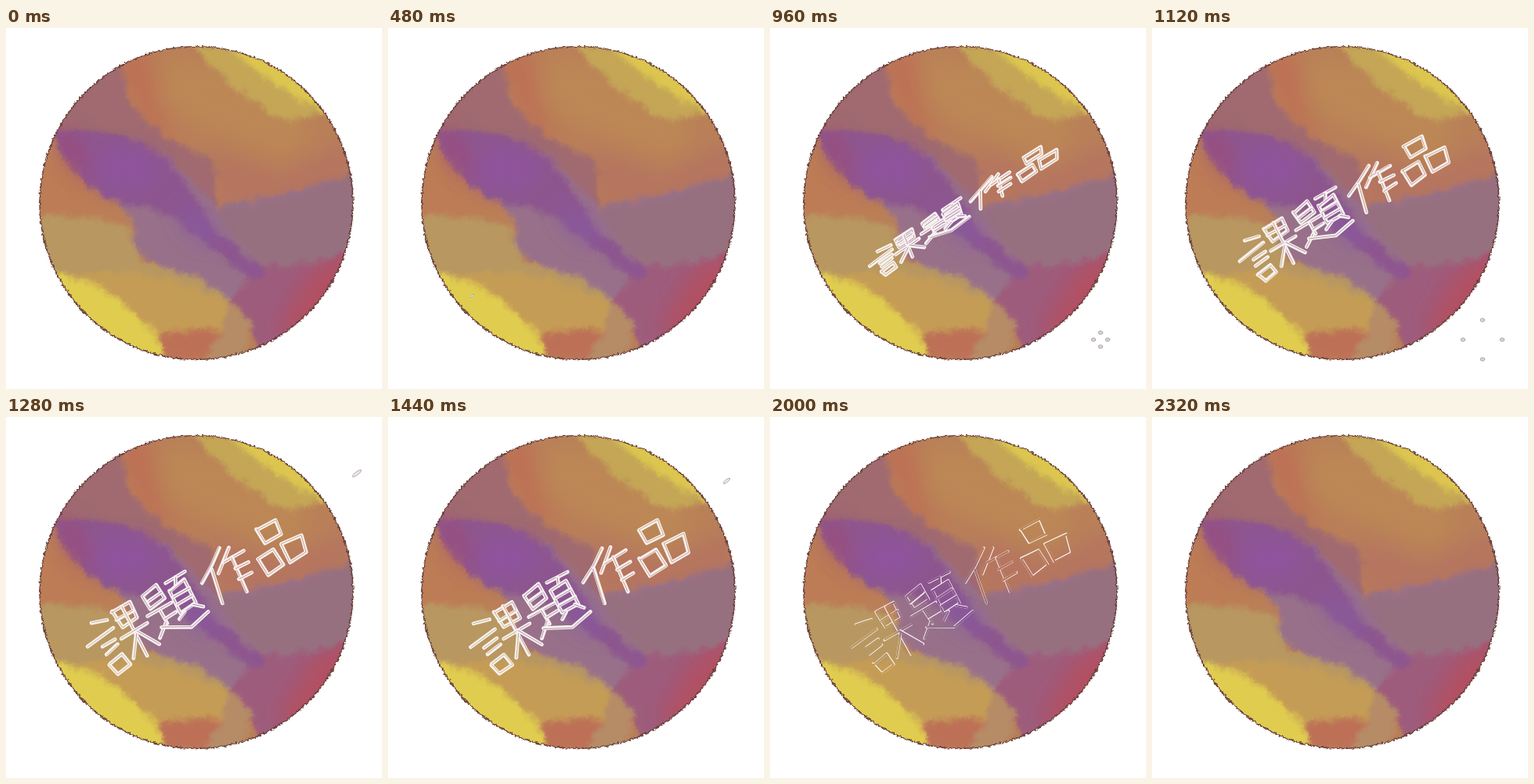
Animation, 480 px wide and 461 px high, one loop 2560 ms. Source, as an HTML page with a canvas:

```html
<!DOCTYPE html>
<html lang="ja">
<head>
<meta charset="utf-8">
<style>
html, body { margin: 0; width: 100%; height: 100%; overflow: hidden; background: #fff; }
svg, canvas { position: absolute; left: 0; top: 0; width: 480px; height: 461px; }
</style>
</head>
<body>
<svg viewBox="0 0 480 461">
  <defs>
    <filter id="rough" x="-5%" y="-5%" width="110%" height="110%">
      <feTurbulence type="fractalNoise" baseFrequency=".3" numOctaves="2" seed="4"/>
      <feDisplacementMap in="SourceGraphic" scale="5" xChannelSelector="R" yChannelSelector="G"/>
    </filter>
    <filter id="wash" x="-20%" y="-20%" width="140%" height="140%">
      <feGaussianBlur stdDeviation="3" result="b"/>
      <feTurbulence type="fractalNoise" baseFrequency=".06" numOctaves="3" seed="9"/>
      <feDisplacementMap in="b" scale="14" xChannelSelector="R" yChannelSelector="G"/>
    </filter>
    <filter id="soft" x="-40%" y="-40%" width="180%" height="180%"><feGaussianBlur stdDeviation="13"/></filter>
    <clipPath id="disc"><circle cx="243" cy="223.500" r="200"/></clipPath>
  </defs>
  <g filter="url(#rough)">
    <g clip-path="url(#disc)">
      <path fill="#b98059" d="M30 10H460V440H30Z"/>
      <g filter="url(#soft)">
        <path fill="#bd7055" d="M135 30L180 25L205 130L250 155L180 135Z"/>
        <path fill="#b5745f" d="M255 150L350 185L444 140V220L270 235Z"/>
        <path fill="#bc8754" d="M205 40L300 50L390 125L360 165L250 125L195 90Z"/>
        <path fill="#bd7b55" d="M40 150L80 170L150 240L90 240L40 270Z"/>
        <path fill="#bd7057" d="M180 375L290 375L280 430H190Z"/>
      </g>
      <g filter="url(#wash)">
        <path fill="#a06a70" d="M40 135L90 55L145 45L160 100L190 130L265 170L270 230L225 240L130 140Z"/>
        <path fill="#98708a" d="M130 205L200 160L270 230L440 190L450 300L330 400L285 350L200 308L165 285L160 245Z"/>
        <path fill="#b89760" d="M40 242Q100 235 155 255L175 300L245 318L290 350L280 385L225 383L40 315Z"/>
        <path fill="#c59c55" d="M60 322Q130 300 205 322L285 350L275 385L215 385L190 400Z"/>
        <path fill="#b58c66" d="M285 350L318 370L300 425H255L275 385Z"/>
        <path fill="#c4a656" d="M235 15L395 50L420 105L365 118Q320 105 260 47Z"/>
        <path fill="#9e5b7b" d="M325 300Q390 305 450 270V350L330 430L310 370L285 350Z"/>
      </g>
      <path filter="url(#soft)" fill="#b84d5d" opacity=".8" d="M390 310L455 275L430 360L370 410L350 380Z"/>
      <g filter="url(#wash)">
        <path fill="#8d568f" d="M55 130Q130 125 190 155Q230 190 265 255Q300 290 330 305L325 325Q265 290 225 248Q180 225 130 220Q85 190 55 130Z"/>
        <path fill="#97707f" d="M270 232Q360 225 455 180L445 280Q390 310 325 300Q290 275 270 232Z"/>
        <path fill="#e0cd50" d="M60 312Q110 317 165 365Q195 387 205 430L130 420L50 350Z"/>
        <path fill="#dcc64f" d="M275 15L350 30L420 115Q360 85 330 62Q300 40 275 15Z"/>
      </g>
      <g filter="url(#soft)">
        <ellipse cx="152" cy="180" rx="40" ry="25" fill="#8f52a4" opacity=".7"/>
        <path fill="#9f4c76" opacity=".8" d="M60 128L90 135L115 205L80 175Z"/>
        <ellipse cx="245" cy="253" rx="35" ry="14" transform="rotate(42 245 253)" fill="#865aa6" opacity=".6"/>
      </g>
    </g>
    <circle cx="243" cy="223.500" r="200" fill="none" stroke="#69413b" stroke-width="1.700"/>
  </g>
</svg>
<canvas width="480" height="461" role="img" aria-label="課題作品"></canvas>
<script>
const STEP = 80, LOOP = 2560, INK = "#f7f1ef";
const ctx = document.querySelector("canvas").getContext("2d");

// Brush strokes of each character; "," separates strokes.
const glyphs = [
  // 課
  `110 264 129 259, 105 294 136 270, 123 294 139 283, 128 303 143 291,
   132 316 149 303 158 316 143 328 132 316, 135 249 158 236 168 256 148 269 135 249,
   141 260 163 247, 147 242 180 304, 147 284 180 264, 166 276 163 308, 167 273 196 290`,
  // 題
  `174 229 192 214 203 232 185 245 174 229, 180 237 197 224, 180 255 212 237,
   197 247 207 264, 203 257 217 248, 204 262 197 282, 199 269 236 268 259 248,
   203 212 229 197, 217 205 217 215, 208 222 228 208 243 238 223 250 208 222,
   213 231 233 219, 218 240 238 229, 228 248 222 259, 238 240 251 243`,
  // 作
  `273 168 262 190 250 212, 262 194 276 237, 284 166 272 200,
   277 186 304 171, 288 180 307 223, 292 194 309 185, 298 208 314 199`,
  // 品
  `320 144 344 131 352 150 330 161 320 144, 321 181 342 169 354 189 335 203 321 181,
   351 162 378 150 384 173 363 185 351 162`
].flatMap(g => g.split(",").map(s => s.trim().split(/\s+/).map(Number)));

const clamp = x => Math.max(0, Math.min(1, x));
const mix = (a, b, k) => a + (b - a) * k;

function randomizer(seed) {
  return () => {
    seed = (seed * 16807) % 2147483647;
    return seed / 1073741823.5 - 1;
  };
}

function trace(points, dx = 0, dy = 0) {
  ctx.beginPath();
  for (const [x, y] of points) ctx.lineTo(x + dx, y + dy);
}

function erase(width) {
  ctx.globalCompositeOperation = "destination-out";
  ctx.lineWidth = width;
  ctx.stroke();
  ctx.globalCompositeOperation = "source-over";
}

function drawSlash(p) {
  ctx.save();
  ctx.beginPath();
  ctx.rect(0, 0, 143 + 212 * p, 461);
  ctx.clip();
  ctx.fillStyle = INK;
  trace([[143, 312], [145, 304], [152, 299], [192, 268], [240, 235], [335, 171], [355, 159],
    [345, 167], [350, 167], [339, 176], [240, 244], [190, 281]]);
  ctx.fill();
  trace([[198, 271], [262, 227], [330, 180]]);
  erase(.8);
  ctx.restore();
}

// The lettering unfolds from the slash, then its strokes hollow out.
function drawLetters(t) {
  const k = clamp((t - 800) / 400), hollow = clamp((t - 1680) / 320);
  const cos = .814, sin = -.581;
  const along = mix(.87, 1, k), across = mix(.04, 1, k);
  const rnd = randomizer(t * 7 + 11);
  const place = (x, y) => {
    x -= 245; y -= 231;
    const u = (x * cos + y * sin) * along, v = (y * cos - x * sin) * across;
    return [mix(249, 245, k) + u * cos - v * sin, mix(236, 231, k) + u * sin + v * cos];
  };
  ctx.strokeStyle = INK;
  for (const s of glyphs) {
    const pts = [];
    for (let i = 0; i < s.length; i += 2)
      pts.push(place(s[i] + rnd(), s[i + 1] + rnd()));
    trace(pts);
    ctx.lineWidth = mix(4.8, 3.2, hollow);
    ctx.stroke();
    trace(pts, rnd(), rnd());
    erase(mix(.7, 2.4, hollow));
  }
}

function drawBurst(t, start, end, x, y, speed, size) {
  if (t < start || t > end) return;
  const r = 1 + (t - start) / STEP * speed;
  ctx.fillStyle = "#ded3d3";
  ctx.strokeStyle = size > 2 ? "#a49b9d" : "#77717a";
  ctx.lineWidth = .8;
  for (let i = 0; i < 4; i++) {
    const a = i * Math.PI / 2;
    ctx.beginPath();
    ctx.ellipse(x + r * Math.cos(a), y + r * Math.sin(a), size, size * .8, 0, 0, 7);
    ctx.fill();
    ctx.stroke();
  }
}

function drawStreak(t, start, x0, y0, x1, y1) {
  const p = (t - start) / 400;
  if (p < 0 || p > 1) return;
  ctx.save();
  ctx.translate(mix(x0, x1, p), mix(y0, y1, p));
  ctx.rotate(-.65);
  ctx.lineWidth = .8;
  ctx.strokeStyle = "#aaa0a2";
  ctx.fillStyle = "#eee6e6";
  ctx.beginPath();
  ctx.ellipse(0, 0, mix(7, 2.8, p), mix(2, 1.2, p), 0, 0, 7);
  ctx.fill();
  ctx.stroke();
  ctx.restore();
}

function frame(now) {
  const t = Math.floor(now % LOOP / STEP) * STEP;
  ctx.clearRect(0, 0, 480, 461);
  ctx.lineCap = ctx.lineJoin = "round";
  if (t >= 640 && t <= 800) drawSlash((t - 560) / 240);
  if (t > 800 && t < 2320) drawLetters(t);
  drawStreak(t, 80, 54, 376, 107, 342);
  drawStreak(t, 1280, 448, 72, 409, 96);
  drawBurst(t, 560, 880, 57, 80, 5, 1.6);
  drawBurst(t, 880, 1200, 422, 398, 8, 2.8);
  requestAnimationFrame(frame);
}
requestAnimationFrame(frame);
</script>
</body>
</html>
```
